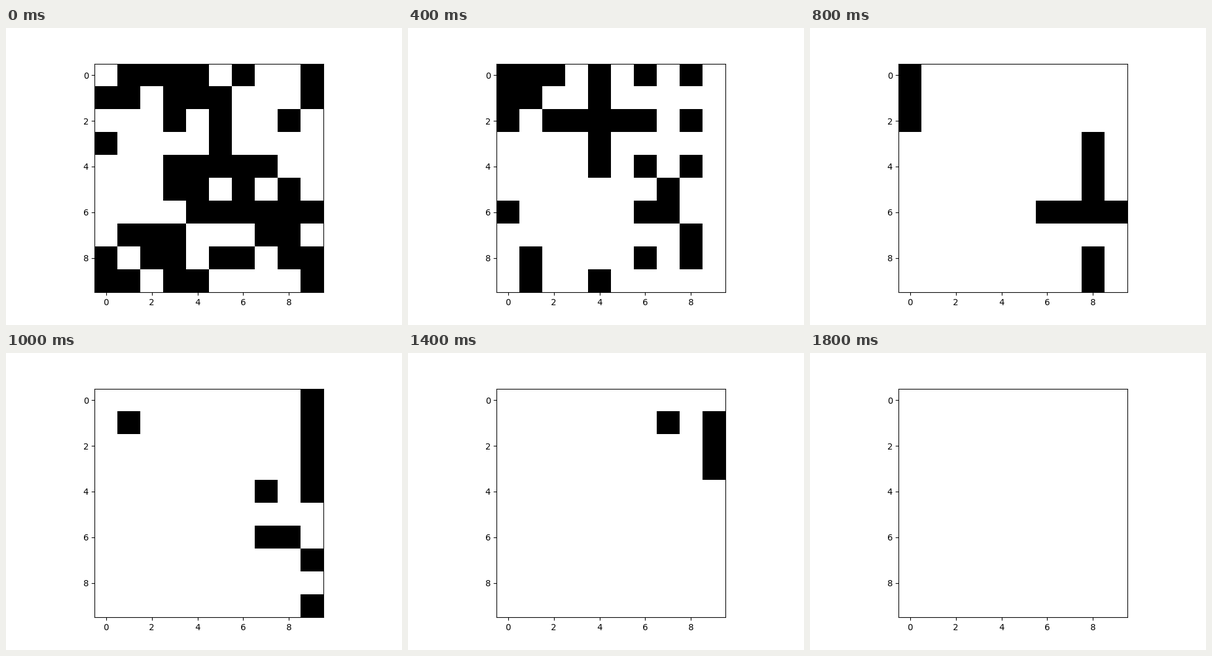
Recreate the animation shown at these times as a matplotlib script. Size 640 px wide and 480 px high, loop 8000 ms.

```python
import numpy as np
import matplotlib.pyplot as plt
from matplotlib.animation import FuncAnimation

STEP_MS = 200
FRAMES = 40

SEED = """
.####.#..#
##.###...#
...#.#..#.
#....#....
...#####..
...##.#.#.
....######
.###...##.
#.##.##.##
##.##....#
""".split()


def step(grid):
    """Wrapped cellular automaton: born on 3 neighbours, survives on 3 or 6."""
    n = sum(np.roll(grid, (dy, dx), (0, 1))
            for dy in (-1, 0, 1) for dx in (-1, 0, 1)) - grid
    return ((n == 3) | ((grid == 1) & (n == 6))).astype(int)


states = [np.array([[int(c == "#") for c in row] for row in SEED])]
while len(states) < FRAMES:
    states.append(step(states[-1]))

fig, ax = plt.subplots(figsize=(6.4, 4.8), dpi=100)
image = ax.imshow(states[0], cmap="binary", vmin=0, vmax=1,
                  interpolation="nearest")


def update(i):
    image.set_data(states[i])
    return [image]


anim = FuncAnimation(fig, update, frames=FRAMES, interval=STEP_MS,
                     repeat=True, repeat_delay=0)
plt.show()
```
